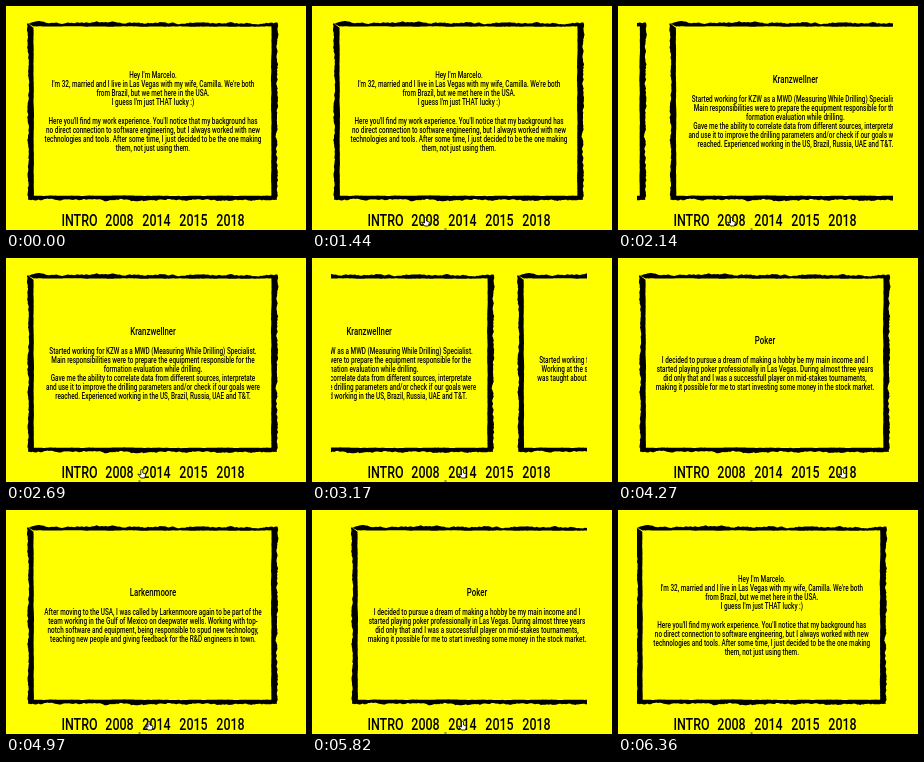
Write an HTML page with a canvas that moves like this. It is 300 by 224 pixels and loops after 7.14 s.

```html
<!DOCTYPE html>
<html lang="en">
<head>
<meta charset="utf-8">
<title>Career timeline</title>
<style>
html, body { margin: 0; width: 100%; height: 100%; overflow: hidden; background: #ff0; }
canvas { display: block; width: 300px; height: 224px; }
</style>
</head>
<body>
<canvas id="stage"></canvas>
<script>
const W = 300, H = 224, LOOP = 7140;
const PITCH = 274, MID = 147, LINE = 9.1, NARROW = 0.725;
const STEP = 75, LEAD = 11;
const canvas = document.getElementById('stage');
const ctx = canvas.getContext('2d');
const dpr = window.devicePixelRatio || 1;
canvas.width = W * dpr;
canvas.height = H * dpr;

const slides = [
  { lines: [
    "Hey I'm Marcelo.",
    "I'm 32, married and I live in Las Vegas with my wife, Camilla. We're both",
    "from Brazil, but we met here in the USA.",
    "I guess I'm just THAT lucky :)",
    "",
    "Here you'll find my work experience. You'll notice that my background has",
    "no direct connection to software engineering, but I always worked with new",
    "technologies and tools. After some time, I just decided to be the one making",
    "them, not just using them."] },
  { title: "Kranzwellner", lines: [
    "Started working for KZW as a MWD (Measuring While Drilling) Specialist.",
    "Main responsibilities were to prepare the equipment responsible for the",
    "formation evaluation while drilling.",
    "Gave me the ability to correlate data from different sources, interpretate",
    "and use it to improve the drilling parameters and/or check if our goals were",
    "reached. Experienced working in the US, Brazil, Russia, UAE and T&T."] },
  { title: "Larkenmoore", lines: [
    "Started working for Larkenmoore as a trainee on the Brazilian east coast.",
    "Working at the shop, I learned to prepare and repair the tools, and then I",
    "was taught about Wireline services, from basic logs to full field jobs on the",
    "offshore rigs."] },
  { title: "Poker", lines: [
    "I decided to pursue a dream of making a hobby be my main income and I",
    "started playing poker professionally in Las Vegas. During almost three years",
    "did only that and I was a successfull player on mid-stakes tournaments,",
    "making it possible for me to start investing some money in the stock market."] },
  { title: "Larkenmoore", lines: [
    "After moving to the USA, I was called by Larkenmoore again to be part of the",
    "team working in the Gulf of Mexico on deepwater wells. Working with top-",
    "notch software and equipment, being responsible to spud new technology,",
    "teaching new people and giving feedback for the R&D engineers in town."] }
];
const nav = ["INTRO", "2008", "2014", "2015", "2018"];
const navX = i => i ? 76.5 + 37 * i : 73.5;

// Each click scrolls to the next slide, the last one back to the first
const clicks = [1820, 3020, 3800, 4430, 5510];

// The pointer travels to each stop and arrives at the given time
const link = (i, at) => ({ at, x: navX(i), y: 211 });
const outside = at => ({ at, x: 133, y: 227 });
const stops = [outside(0), { at: 980, x: 91, y: 216 }, link(1, 1440), link(2, 2850),
  link(3, 3630), link(4, 4260), link(0, 5155), link(2, 5820), outside(6280)];
const TRAVEL = 400;

const lerp = (a, b, k) => a + (b - a) * k;

// CSS ease-in-out, solved for the curve parameter by bisection
function easeInOut(x) {
  if (x >= 1) return 1;
  let lo = 0, hi = 1;
  for (let i = 0; i < 24; i++) {
    const u = (lo + hi) / 2, v = 1 - u;
    if (1.26 * u * v * v + 1.74 * u * u * v + u * u * u < x) lo = u; else hi = u;
  }
  return 3 * lo * lo - 2 * lo * lo * lo;
}

function scrollAt(t) {
  const i = clicks.filter(c => c <= t).length - 1;
  if (i < 0) return 0;
  const to = (i + 1) % slides.length;
  const duration = 250 + 155 * Math.abs(to - i);
  const elapsed = Math.floor((t - clicks[i]) / STEP) * STEP + LEAD;
  return PITCH * lerp(i, to, easeInOut(elapsed / duration));
}

function pointerAt(t) {
  const i = stops.findIndex(s => s.at > t);
  if (i < 0) return stops[stops.length - 1];
  const a = stops[i - 1], b = stops[i];
  const k = Math.max(0, 1 - (b.at - t) / Math.min(TRAVEL, b.at - a.at));
  return { x: lerp(a.x, b.x, k), y: lerp(a.y, b.y, k) };
}

let seed = 41;
function rnd() {
  seed = (seed * 16807) % 2147483647;
  return seed / 2147483647;
}

// Rectangle with a wandering, brush-like edge
function roughRect(path, l, t, r, b, rough) {
  const corners = [[l, t], [r, t], [r, b], [l, b]];
  let drift = 0;
  corners.forEach(([x, y], i) => {
    const [x1, y1] = corners[(i + 1) % 4];
    const len = Math.hypot(x1 - x, y1 - y);
    const nx = (y1 - y) / len, ny = (x - x1) / len;
    for (let d = 0; d < len; d += 1.5) {
      drift = drift * 0.8 + (rnd() - 0.5) * rough;
      path.lineTo(lerp(x, x1, d / len) + nx * drift, lerp(y, y1, d / len) + ny * drift);
    }
  });
  path.closePath();
}

const frame = new Path2D();
roughRect(frame, 21.9, 16.8, 271, 194, 1.3);
roughRect(frame, 27.7, 20.5, 265.3, 189.8, 0.3);

function text(str, x, y, size) {
  ctx.save();
  ctx.translate(x, y);
  ctx.scale(NARROW, 1);
  ctx.font = `500 ${size}px Roboto, sans-serif`;
  ctx.fillText(str, 0, 0);
  ctx.restore();
}

function drawSlide({ title, lines }, x) {
  ctx.save();
  ctx.translate(x, 0);
  ctx.fill(frame, 'evenodd');
  const middle = title ? 118.7 : 108.4;
  const top = middle - (lines.length - 1) / 2 * LINE;
  if (title) text(title, MID, top - 18.6, 10.8);
  lines.forEach((s, i) => text(s, MID, top + i * LINE, 8.8));
  ctx.restore();
}

const hand = new Path2D('M-1 1Q0-1 1 1V4L4 5L3 9H-1L-4 5L-1 6Z');
const arrow = new Path2D('M0 0V8L2 6H5Z');

function drawPointer(t) {
  const { x, y } = pointerAt(t);
  const over = nav.some((s, i) => y < 217 && Math.abs(x - navX(i)) < 16);
  const shape = over ? hand : arrow;
  ctx.save();
  ctx.translate(x, y);
  ctx.lineWidth = 0.8;
  ctx.fillStyle = '#fff';
  ctx.fill(shape);
  ctx.stroke(shape);
  ctx.restore();
}

// Faint trace left where the pointer came in
function drawTrace() {
  ctx.fillStyle = 'rgba(70,70,40,.6)';
  ctx.fillRect(132.5, 222, 2, 2);
}

function draw(t) {
  ctx.setTransform(dpr, 0, 0, dpr, 0, 0);
  ctx.fillStyle = '#ff0';
  ctx.fillRect(0, 0, W, H);
  ctx.fillStyle = '#000';
  ctx.textAlign = 'center';

  const scroll = scrollAt(t);
  ctx.save();
  ctx.beginPath();
  ctx.rect(19, 14, 256, 186);
  ctx.clip();
  slides.forEach((slide, i) => drawSlide(slide, i * PITCH - scroll));
  ctx.restore();

  nav.forEach((s, i) => text(s, navX(i), 219.5, 17.2));
  if (t >= 750) drawTrace();
  drawPointer(t);
}

const begin = performance.now();
function tick() {
  draw((performance.now() - begin) % LOOP);
  requestAnimationFrame(tick);
}
tick();
</script>
</body>
</html>
```
